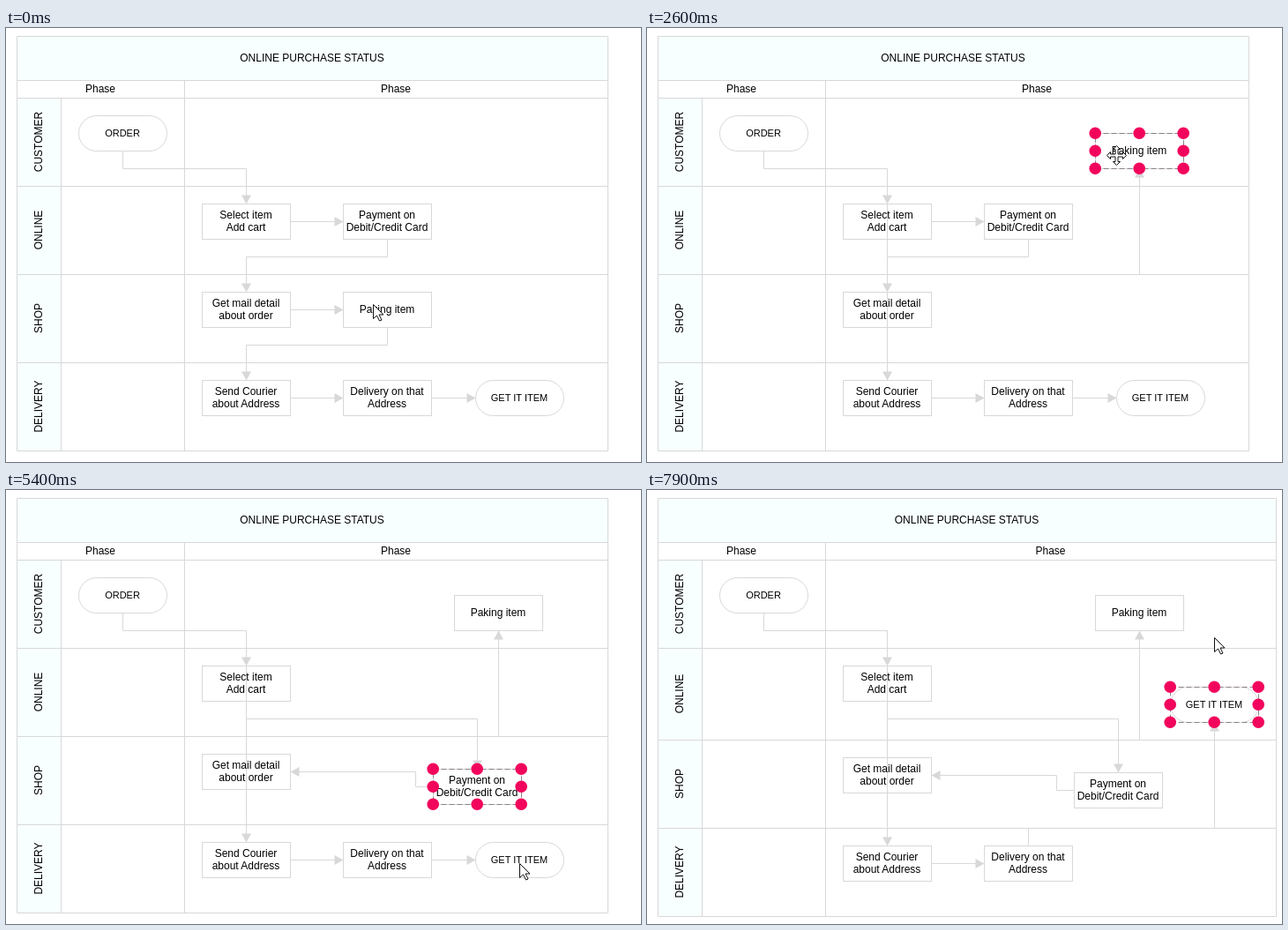
These frames come from a looping animation (720x492 px, 8 s). An HTML page:

```html
<!DOCTYPE html>
<html lang="en">
<head>
<meta charset="utf-8">
<title>Swimlane diagram</title>
<style>
html, body { margin: 0; width: 100%; height: 100%; overflow: hidden; background: #fff; }
svg { display: block; width: 720px; height: 492px; }
text { font: 12px "Liberation Sans", Arial, sans-serif; text-anchor: middle; }
.pill { font-size: 11px; }
.tip { font: bold 11px Roboto, sans-serif; fill: #fff; }
.line { fill: none; stroke: #d8d8d8; }
.node { fill: #fff; stroke: #d8d8d8; }
.tint { fill: #f8ffff; }
.head { fill: #d8d8d8; }
.bubble { fill: #6f6f6f; }
.lane { fill: none; stroke: #0a84f5; stroke-width: 2; stroke-dasharray: 6 3; }
.ghost { fill: none; stroke: #8c8c8c; stroke-width: 2; stroke-dasharray: 2 2; }
.frame { fill: none; stroke: #8c8088; stroke-dasharray: 6 3; }
.knob { fill: #f2055c; }
.cursor { fill: #fff; stroke: #111; }
</style>
</head>
<body>
<svg viewBox="0 0 720 492"><g id="scene" transform="translate(.5 .5)"></g></svg>
<script>
const LOOP = 8000, STEP = 50, W = 100, H = 40;
const scene = document.getElementById('scene');
const lanes = ['CUSTOMER', 'ONLINE', 'SHOP', 'DELIVERY'];

const ARROW = 'M0 0V16L4 12.5 7 18.5 9.5 17.5 6.5 11.5H11.5Z';
const MOVE = 'M0-11L4-7H1.5V-1.5H7V-4L11 0 7 4V1.5H1.5V7H4L0 11-4 7H-1.5V1.5H-7V4L-11 0-7-4V-1.5H-1.5V-7H-4Z';

// Nodes in flow order; each one is wired to the next.
const node = (x, lane, ...lines) => ({ x, y: 99 + 100 * lane, lines });
const flow = [
  node(82, 0, 'ORDER'),
  node(222, 1, 'Select item', 'Add cart'),
  node(382, 1, 'Payment on', 'Debit/Credit Card'),
  node(222, 2, 'Get mail detail', 'about order'),
  node(382, 2, 'Paking item'),
  node(222, 3, 'Send Courier', 'about Address'),
  node(382, 3, 'Delivery on that', 'Address'),
  node(532, 3, 'GET IT ITEM')
];
flow[0].pill = flow[7].pill = true;

// bend: easing power per axis; grip: pointer offset; leave: where the pointer goes next.
const drags = [
  { node: flow[4], select: 300, grab: 700, start: 1050, settle: 1960, drop: 2500, free: 2850,
    to: [508, 119], bend: [2.42, .663], grip: [24, 25], leave: [453, 218], glide: 400 },
  { node: flow[2], select: 3500, grab: 3800, start: 4050, settle: 4700, drop: 5000, free: 5000,
    to: [484, 316], bend: [1.63, 1.63], grip: [55, 18], leave: [582, 423], glide: 400 },
  { node: flow[7], select: 5800, grab: 5900, start: 6200, settle: 6850, drop: 7450, free: 7800,
    to: [593, 223], bend: [3.85, 2.81], grip: [52, 38], leave: [643, 167], glide: 100 }
];

const ease = (t, a, b, power) => 1 - (1 - Math.min(1, Math.max(0, (t - a) / (b - a)))) ** power;
const mix = (a, b, k) => Math.round(a + (b - a) * k);

const ghostAt = (g, t) => [g.node.x, g.node.y].map((v, i) =>
  mix(v, g.to[i], ease(t, g.start, g.settle, g.bend[i])));

function pointerAt(t) {
  const g = drags.findLast(g => t >= g.grab);
  if (!g) return { x: 416, y: 313 };
  const held = ghostAt(g, t + STEP).map((v, i) => v + g.grip[i]);
  const [x, y] = held.map((v, i) => mix(v, g.leave[i], ease(t, g.free, g.free + g.glide, 2)));
  return { x, y, moving: t < g.free };
}

const rect = (cls, x, y, w, h, r = 0) =>
  `<rect class="${cls}" x="${x}" y="${y}" width="${w}" height="${h}" rx="${r}"/>`;
const path = (cls, d, x = 0, y = 0, turn = 0) =>
  `<path class="${cls}" d="${d}" transform="translate(${x} ${y}) rotate(${turn})"/>`;
// Text sits on whole pixels, strokes on half pixels.
const text = (s, x, y, cls = '', turn = 0) =>
  `<text class="${cls}" transform="translate(${x - .5} ${y - .5}) rotate(${turn})">${s}</text>`;

function table(right, tops) {
  const bottom = tops[4];
  return rect('tint', 12, 9, right - 12, 50) + rect('tint', 12, 79, 50, bottom - 79) +
    path('line', `M12 9H${right}V${bottom}H12ZM12 59H${right}M62 79V${bottom}M202 59V${bottom}` +
      tops.slice(0, 4).map(y => `M12 ${y}H${right}`).join('')) +
    text('ONLINE PURCHASE STATUS', (12 + right) / 2, 38) +
    text('Phase', 107, 73) + text('Phase', (202 + right) / 2, 73) +
    lanes.map((name, i) => text(name, 41, (tops[i] + tops[i + 1]) / 2, '', -90)).join('');
}

// Straight along a row, sideways to a near row, otherwise out of the bottom or top.
function wire(a, b) {
  const ax = a.x + W / 2, bx = b.x + W / 2, ay = a.y + H / 2, by = b.y + H / 2;
  const arrow = (d, x, y, turn) => path('line', d) + path('head', 'M0 0L-10-5.5V5.5Z', x, y, turn);
  if (a.y === b.y) return arrow(`M${a.x + W} ${ay}H${b.x}`, b.x, by, 0);
  if (Math.abs(a.y - b.y) < H)
    return arrow(`M${a.x} ${ay}H${a.x - 20}V${by}H${b.x + W}`, b.x + W, by, 180);
  const down = b.y > a.y;
  const out = down ? a.y + H : a.y, end = down ? b.y : b.y + H;
  return arrow(`M${ax} ${out}V${out + (down ? 20 : -20)}H${bx}V${end}`, bx, end, down ? 90 : -90);
}

function label({ x, y, lines, pill }) {
  const first = y + 31 - 7 * (3 - lines.length) + (lines.length > 1 ? -7 : 7);
  return lines.map((s, i) => text(s, x + W / 2, first + 14 * i, pill ? 'pill' : '')).join('');
}

function selection({ x, y }) {
  let out = rect('frame', x, y, W, H);
  for (const i of [0, 1, 2])
    for (const j of [0, 1, 2])
      if (i !== 1 || j !== 1)
        out += `<circle class="knob" cx="${x + i * W / 2 - .3}" cy="${y + j * H / 2 - .3}" r="6.8"/>`;
  return out;
}

function dragging(g, t, pointerY) {
  const lane = Math.floor((pointerY - 79) / 100), top = 79 + lane * 100;
  const away = g.node.y < top || g.node.y > top + 100;
  const tip = path('bubble', 'M0 0l6.5 6.5h-13Z', 345.5, top + 111.5) +
    rect('bubble', 309.5, top + 117.5, 66, 24, 3) +
    text(`X:85 Y:${top + 26}`, 343, top + 133, 'tip');
  return rect('lane', 12, top, 670, 100) + rect('ghost', ...ghostAt(g, t), W, H) + (away ? tip : '');
}

function draw(t) {
  const grown = t >= drags[2].drop, shift = grown ? 4 : 0;
  const nodes = flow.map(n => {
    const moved = drags.find(g => g.node === n && t >= g.drop);
    const [x, y] = moved ? moved.to : [n.x, n.y];
    return { ...n, x, y: y > 279 ? y + shift : y };
  });
  const tops = [0, 1, 2, 3, 4].map(i => 79 + 100 * i + (i > 1 ? shift : 0));
  const drag = drags.find(g => t >= g.start && t < g.drop);
  const picked = drags.findLast(g => t >= g.select);
  const pointer = pointerAt(t);

  return table(grown ? 713 : 682, tops) +
    nodes.map(n => rect('node', n.x, n.y, W, H, n.pill ? H / 2 : 0)).join('') +
    nodes.slice(1).map((n, i) => wire(nodes[i], n)).join('') +
    nodes.map(label).join('') +
    (drag ? dragging(drag, t, pointer.y) : picked ? selection(nodes[flow.indexOf(picked.node)]) : '') +
    path('cursor', pointer.moving ? MOVE : ARROW, pointer.x, pointer.y);
}

let shown = -1;
function tick() {
  const t = Math.floor(performance.now() % LOOP / STEP) * STEP;
  if (t !== shown) scene.innerHTML = draw(shown = t);
  requestAnimationFrame(tick);
}
tick();
</script>
</body>
</html>
```
